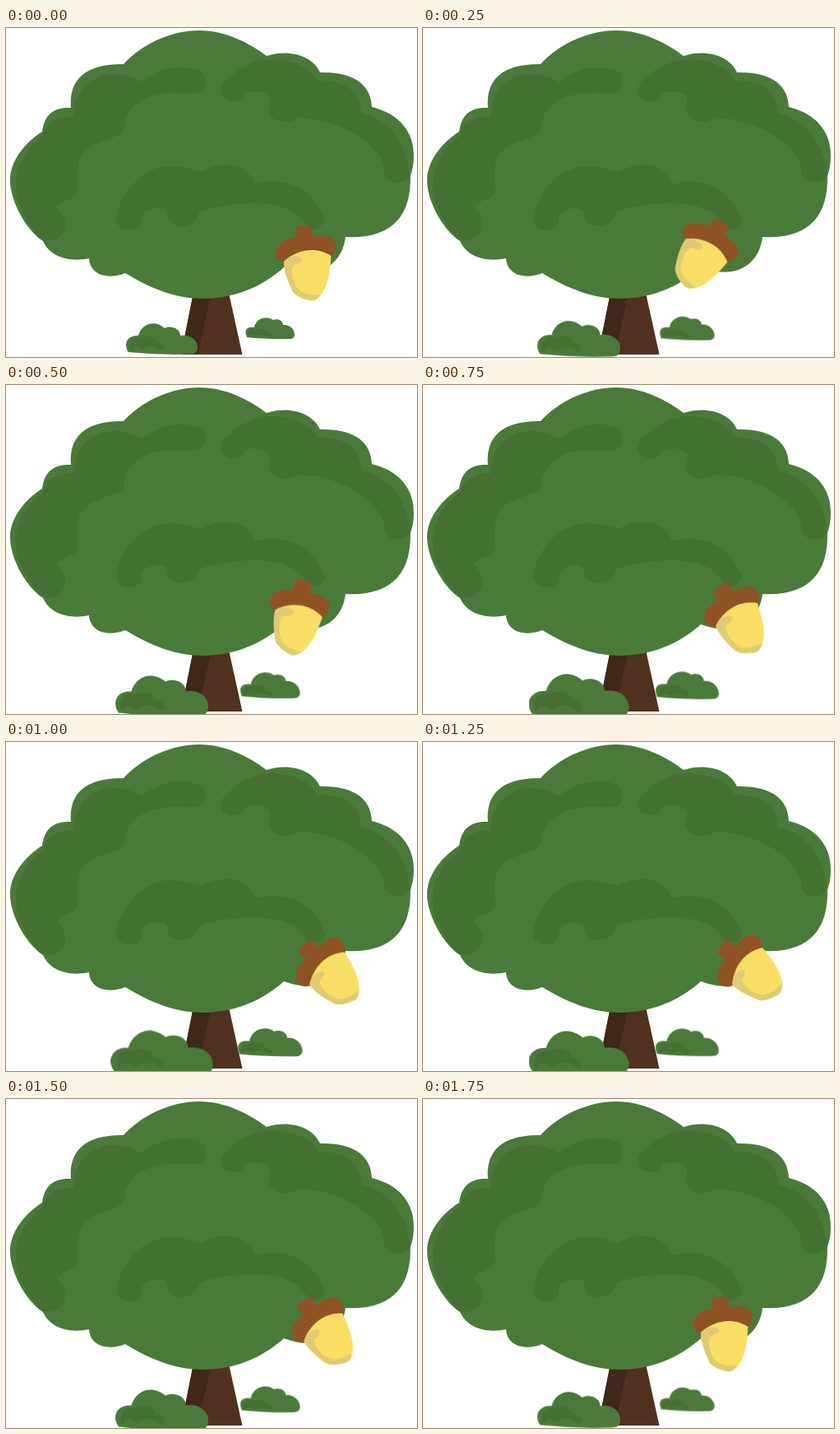
An HTML page for the animation above (1.85 s loop, 500 by 400 pixels).

```html
<!DOCTYPE html>
<html lang="en">
<head>
<meta charset="utf-8">
<title>Oak tree</title>
<style>
html, body { margin: 0; width: 100%; height: 100%; overflow: hidden; background: #fff; }
svg { display: block; width: 500px; height: 400px; }
.leaf { fill: #4a7a39; }
.shade { fill: #447032; }
#bigBush { transform-origin: 189.5px 379px; }
#smallBush { transform-origin: 321px 365px; }
#acorn { transform-origin: 371px 242px; }
</style>
</head>
<body>
<svg viewBox="0 0 500 400">
  <path fill="#50311f" d="M228 322H271L287.500 397H213Z"/>
  <path fill="#3f271a" d="M228 322H250L233 397H213Z"/>

  <path class="leaf" d="M143 44C165 20 200 3 235 3C268 3 297 19 317 34C345 25 373 34 382 54
    C425 53 444 70 445 96C478 104 497 126 496 157C496 166 494 174 492 180C493 228 470 257 413 254
    C409 288 380 307 338 291C318 309 285 329 240 329C205 329 175 316 145 298C122 307 102 299 101 280
    C78 285 54 279 45 259C26 247 5 212 5 185C5 160 25 138 44 126C47 105 58 96 79 97C76 62 98 43 143 44Z"/>
  <path class="shade" d="M235 52C215 43 185 48 165 66C140 48 85 50 82 108C60 106 46 120 46 130
    C25 145 12 170 12 190C12 205 15 213 20 223C27 239 35 250 45 258C60 261 71 253 72 240
    C73 225 62 222 62 217C68 208 88 210 88 195C86 180 87 170 89 160C98 140 120 138 138 130Q143 127 144 120
    C146 100 160 85 190 80C205 77 220 80 232 79C243 77 243 70 242 60C241 54 238 53 235 52Z"/>
  <path class="shade" d="M270 62C285 45 310 37 325 38C355 40 372 50 379 64C415 63 432 80 432 104
    C465 110 489 140 491 180C487 191 461 191 460 175C463 150 415 110 355 109C345 117 325 117 320 102
    C318 95 322 90 321 84C312 75 298 76 290 80C290 90 272 92 264 84C260 80 260 68 270 62Z"/>
  <path class="shade" d="M134 232C140 195 170 168 200 168C215 168 228 172 237 175C265 160 295 165 303 190
    C340 180 375 195 388 234C384 243 378 246 368 245C358 218 325 213 300 213C275 214 250 217 235 224
    C232 243 205 245 198 234C195 226 197 222 192 220C180 217 165 222 165 232C167 240 160 246 150 246
    C140 246 134 240 134 232Z"/>

  <g id="bigBush">
    <path class="leaf" d="M149 394C142 384 148 373 161 374C165 360 180 354 193 365C200 361 212 365 212 374
      C224 372 233 379 233 388Q233 396 226 396.500Q187 398 149 394Z"/>
    <path class="shade" d="M151 391C150 378 158 374 165 377C172 373 182 375 183 382C190 382 194 388 191 392
      C186 393 186 387 178 387C172 386 170 388 167 391C163 390 160 386 156 387C154 391 152 393 151 391Z"/>
  </g>
  <g id="smallBush">
    <path class="leaf" d="M293 376C289 366 294 363 302 364C304 353 317 349 325 355C331 353 337 356 337 361
      C345 360 352 367 351 374Q350 378 345 378Q316 378.500 293 376Z"/>
    <path class="shade" d="M294.500 375C294 367 299 364 304 366.500C310 364 316 366 317 370.500C322 370 325 374 322 376
      C318 376 318 373 313 373C309 373 308 374 306 375C303 374 301 372 298 373Q296 376 294.500 375Z"/>
  </g>

  <g id="acorn">
    <path fill="#8f5224" d="M351 243C356 240 366 239 372 242C374 246 371 249 373 253C385 250 396 254 400 259
      C402 268 399 276 396 277C380 274 355 275 338 285C331 283 327 277 328 270C333 260 341 257 353 255
      C350 250 352 247 351 243Z"/>
    <path fill="#f9de66" d="M338 284C353 269 378 265 395.500 277C394 300 391 316 382 326Q376 333 369 331
      Q355 328 349 321C344 310 338 297 338 284Z"/>
    <path fill="#dfcb72" d="M338 284C345 276 357 275 361 281C360 287 351 286 349 290C346 300 350 313 358 320
      C366 325 375 324 382 324.500Q376 333 369 331Q355 328 349 321C344 310 338 297 338 284Z"/>
  </g>
</svg>
<script>
const LOOP = 1850, STEP = 250;
// One row per held pose: acorn angle in degrees, bush growth
const poses = [
  [0, 0], [36, .16], [16, .3], [-22, .4],
  [-36.5, .43], [-44, .4], [-29, .3], [0, .16]
];

function play(id, transform) {
  const frames = poses.map((pose, i) => ({
    transform: transform(...pose),
    offset: i * STEP / LOOP,
    easing: 'steps(1, end)'
  }));
  frames.push({ transform: transform(...poses[0]), offset: 1 });
  document.getElementById(id).animate(frames, { duration: LOOP, iterations: Infinity });
}

play('acorn', angle => `rotate(${angle}deg)`);
play('bigBush', (angle, grow) => `scale(${1 + grow})`);
play('smallBush', (angle, grow) => `scale(${1 + grow * .73})`);
</script>
</body>
</html>
```
